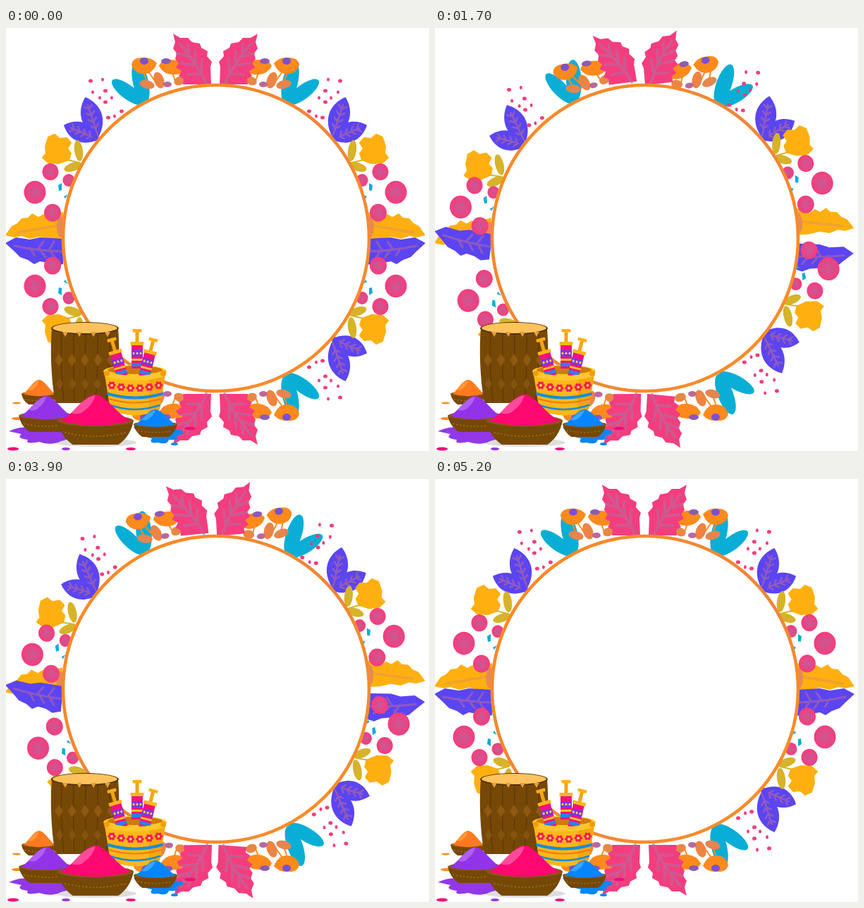
These frames come from a looping animation (600 by 600 pixels, 5.3 s). An HTML page:

```html
<!DOCTYPE html>
<html lang="en">
<head>
<meta charset="utf-8">
<title>Festive wreath</title>
<style>
  html, body { margin: 0; width: 100%; height: 100%; overflow: hidden; background: #fff; }
  svg { display: block; width: 600px; height: 600px; }
</style>
</head>
<body>
<svg id="stage" viewBox="0 0 600 600">
  <defs>
    <radialGradient id="ball"><stop offset=".2" stop-color="#cf5590"/><stop offset=".95" stop-color="#f43d7e"/></radialGradient>
    <linearGradient id="band" x1="0" y1="0" x2="1" y2="1">
      <stop offset="0" stop-color="#ff8c1f"/><stop offset=".5" stop-color="#ef8538"/><stop offset="1" stop-color="#ff8f22"/>
    </linearGradient>
  </defs>
  <g id="plants"></g>
  <circle cx="298" cy="298" r="217" fill="#fff" stroke="url(#band)" stroke-width="4.6"/>
  <g id="props"></g>
</svg>
<script>
const PERIOD = 5300, STEP = 100, CX = 297, CY = 299.5;
const PINK = '#f43d7e', PURPLE = '#5b45f2', YELLOW = '#ffb010', TEAL = '#08aed5',
      ORANGE = '#ff8a1c', OLIVE = '#d6b32a', DUST = '#b8699c', BROWN = '#764806';

const path = (d, fill, extra = '') => `<path d="${d}" fill="${fill}" ${extra}/>`;
const line = (d, color, width = 2, extra = '') =>
  path(d, 'none', `stroke="${color}" stroke-width="${width}" stroke-linecap="round" ${extra}`);
const oval = (x, y, rx, ry, fill, turn = 0) =>
  `<ellipse cx="${x}" cy="${y}" rx="${rx}" ry="${ry}" fill="${fill}" transform="rotate(${turn} ${x} ${y})"/>`;
const rect = (x, y, w, h, fill, r = 0) =>
  `<rect x="${x}" y="${y}" width="${w}" height="${h}" rx="${r}" fill="${fill}"/>`;
const range = (n, draw) => Array.from({ length: n }, (_, i) => draw(i)).join('');

// A leaf growing from (x, y) with side veins
function leaf(x, y, length, width, turn, fill, vein) {
  const veins = range(4, i => {
    const v = -length * (.22 + i * .16), s = width * .2;
    return `M${-s} ${v - 5}L0 ${v}L${s} ${v - 5}`;
  });
  return `<g transform="translate(${x} ${y}) rotate(${turn})">` +
    path(`M0 0C${-width * .75} ${-length * .35} ${-width * .6} ${-length * .75} 0 ${-length}
      C${width * .6} ${-length * .75} ${width * .75} ${-length * .35} 0 0`, fill) +
    line(`M0 0V${-length * .8}${veins}`, vein, 2.5, 'opacity=".6"') + '</g>';
}

// All plants are drawn in the top right quarter, then mirrored
const art = {
  teal: oval(403, 77, 11, 30, TEAL, 13) + oval(421, 91, 10, 28, TEAL, 53),
  purple: leaf(463, 155, 60, 29, 18, PURPLE, DUST) + leaf(462, 158, 54, 27, 68, PURPLE, DUST) +
    line('M459 166L470 152', PURPLE, 6),
  dots: [[457, 73], [474, 75], [471, 91], [453, 89], [444, 99], [453, 105], [461, 99], [430, 118], [440, 125], [449, 127]]
    .map(([x, y], i) => oval(x, y, 2 + i % 2, 2.6, PINK)).join(''),
  pods: line('M352 80L358 64M378 82L392 62M392 82L398 66', ORANGE, 2) +
    oval(348, 75, 8, 6, '#e88745', 20) + oval(377, 74, 7, 12, '#ed8443', 20) +
    oval(394, 80, 11, 6, '#e58550', -15) + oval(365, 80, 6, 4, DUST),
  blooms: path('M339 57Q341 46 358 45Q374 45 377 54Q371 65 359 66Q346 68 339 57M380 50Q388 41 399 42Q414 41 416 52Q412 65 398 65Q386 65 380 50', ORANGE) +
    oval(367, 47, 7, 4, '#8b5ab8') + oval(398, 47, 6, 5, '#7951d0'),
  pinkLeaf: path('M303 80L304 55L302 48L309 40L308 33L317 28L319 22L330 20L336 14L347 14L357 8L354 20L357 29L352 36L354 44L349 50L353 56L345 61L349 68L342 72L343 80Z', PINK) +
    line('M310 80Q320 55 348 22M317 63L316 44M325 52L326 32M335 39L336 23M317 65L337 66M325 53L346 50M334 41L351 36', DUST, 4, 'opacity=".65"'),
  flower: path('M502 163L508 156L518 157L525 151L534 155L538 168L537 178L542 184L534 191L519 192L505 187L502 178L507 171Z', YELLOW, `stroke="${YELLOW}" stroke-width="2" stroke-linejoin="round"`) +
    oval(491, 174, 6, 15, OLIVE, 8) + oval(499, 197, 13, 6, OLIVE, 18) + line('M490 191L507 187', OLIVE),
  balls: [[553, 233, 15.5], [531, 204, 11.5], [505, 216, 8.5], [528, 262, 12]]
    .map(([x, y, r]) => oval(x, y, r, r * 1.05, 'url(#ball)')).join('') +
    path('M515 220L520 223L519 231L515 230ZM506 236L512 239L510 242Z', TEAL),
  yellowLeaf: path('M513 261L524 264L533 269L541 264L548 268L557 263L563 269L572 270L578 277L586 281L595 294L582 297L572 295L560 299L546 296L530 299H513Z', YELLOW) +
    line('M514 279Q535 283 578 290', '#e89a42', 4, 'opacity=".6"') + oval(516, 282, 6, 15, '#e48a58'),
  violetLeaf: path('M513 264L525 261L535 266L546 268L554 264L563 270L574 274L582 282L595 294L580 302L560 299L546 302L513 300Z', PURPLE) +
    line('M514 282Q550 283 582 290M532 284L524 272M546 285L538 274M560 287L553 276M533 284L526 296M549 285L541 296', DUST, 3, 'opacity=".55"')
};

const quarters = [[1, 1], [-1, 1], [-1, -1], [1, -1]];
// Sway in degrees per quarter, clockwise from the top right; [degrees, pivot x, pivot y] moves the pivot
const sways = {
  teal: [[9, 380, 140], [14, 389, 110], null, [-11, 390, 143]],
  yellowLeaf: [[-4.5, 417, 299.5], -3, null, null],
  violetLeaf: [null, null, [10, 460, 299.5], [8, 447, 299.5]],
  purple: [[-11, 467, 149], [-11, 404, 180], null, [-11, 404, 180]],
  dots: [-5.5, -5.5, null, -4],
  pods: [[-14, 372, 105], [-14, 360, 105], -1, 0],
  blooms: [[-14, 384, 129], [-14, 354, 118], -1, 0],
  pinkLeaf: [[-10, 313, 120], [-10, 339, 116], -.5, [7.5, 301, 101]],
  flower: [-4.2, -8, -6.5, -6.5],
  balls: [-4.1, -6.5, -6.5, -7.5]
};

const moving = [];
for (const [name, list] of Object.entries(sways)) {
  list.forEach((sway, q) => {
    if (sway === null) return;
    const [sx, sy] = quarters[q], [turn, px = CX, py = CY] = [sway].flat();
    const node = document.createElementNS('http://www.w3.org/2000/svg', 'g');
    node.innerHTML = art[name];
    plants.append(node);
    moving.push({
      node, turn: turn * sx * sy, pivot: `${px} ${py}`,
      mirror: `translate(${CX} ${CY}) scale(${sx} ${sy}) translate(${-CX} ${-CY})`
    });
  });
}

function bowl(x, y, w, h, peak, color, light) {
  const l = x - w / 2, r = x + w / 2, rise = y - peak;
  return path(`M${l} ${y}Q${x} ${y + h * .25} ${r} ${y}Q${r - w * .04} ${y + h * .65} ${r - w * .2} ${y + h}H${l + w * .2}Q${l + w * .04} ${y + h * .65} ${l} ${y}`, BROWN) +
    oval(x, y, w / 2, h * .24, '#8a5714') +
    path(`M${l + 3} ${y}C${l + w * .2} ${y - 6} ${x - w * .15} ${peak} ${x} ${peak}C${x + w * .14} ${peak} ${r - w * .2} ${y - 6} ${r - 3} ${y}Q${x} ${y + h * .42} ${l + 3} ${y}`, color) +
    path(`M${x - w * .32} ${y - rise * .3}Q${x - w * .13} ${peak + 2} ${x} ${peak + 1}Q${x - w * .04} ${y - rise * .6} ${x - w * .14} ${y - rise * .4}Q${x - w * .2} ${y - rise * .2} ${x - w * .32} ${y - rise * .3}`, light, 'opacity=".8"') +
    line(`M${l + w * .1} ${y + h * .5}Q${x} ${y + h * .8} ${r - w * .1} ${y + h * .5}`, '#a66e1c', 1.5, 'stroke-dasharray="1 4"');
}

const syringe = (x, y, turn) => `<g transform="translate(${x} ${y}) rotate(${turn})">` +
  rect(-2.5, 0, 5, 20, '#f5a40e') + rect(-6.5, -2, 13, 4.5, '#ffae13', 1) +
  rect(-8, 20, 16, 34, '#f6117e') + rect(-8, 28, 16, 9, '#7d35df') + rect(-8, 40, 16, 3, '#ffbf2c') +
  range(3, i => oval(-5 + i * 5, 32.5, 1.5, 1.8, '#ffd04a')) + rect(-8, 46, 16, 5, '#2f7fe8') +
  rect(-9.5, 16, 19, 5, '#ffb51d', 1) + '</g>';

const drum = path('M65 426C62 462 65 506 70 532H153C160 505 162 462 159 426Z', BROWN) +
  range(5, i => line(`M${79 + i * 17} 434Q${77 + i * 18} 485 ${82 + i * 15} 530`, '#613a02', 1.5)) +
  range(5, i => path(`M${75 + i * 18.5} 462l6 9l-6 9l-6 -9Z`, '#8c5913')) +
  range(5, i => path(`M${76 + i * 18} 497l5 8l-5 8l-5 -8Z`, '#855310')) +
  oval(112, 426, 48, 9, '#553100') + oval(112, 425.5, 46, 7.5, '#ffc35d') +
  range(4, i => path(`M${80 + i * 20} 431h8l-4 7Z`, '#e3a23b'));

const bucket = path('M139 486H227L218 541Q183 558 148 541Z', '#ffb719') +
  path('M204 492L226 488L218 541L202 548Z', '#f5a611') +
  oval(183, 487, 45, 9, '#ffc928') + oval(183, 485, 39, 6, '#cf7a09') +
  syringe(150, 442, -16) + syringe(186, 429, 0) + syringe(209, 442, 14) +
  path('M139 487Q183 499 227 487L226 494Q183 506 140 494Z', '#ffc72b') +
  range(6, i => {
    const x = 150 + i * 13.3, y = 506 + 5 * Math.sin((i + .3) / 5.6 * Math.PI);
    return range(6, p => oval(x + 3.7 * Math.cos(p * 1.047), y + 3.7 * Math.sin(p * 1.047), 2.1, 2.1, '#f51c55')) +
      oval(x, y, 1.7, 1.7, '#ffe05f');
  }) +
  line('M145 519Q183 530 221 519', '#168ddd', 4) + line('M146 526Q183 537 220 526', '#f57910', 2) +
  line('M148 535Q183 547 218 535', '#168ddd', 2.5) +
  oval(143, 490, 4, 4, '#f49b0d') + oval(223, 490, 4, 4, '#f49b0d');

props.innerHTML =
  oval(127, 588, 58, 6, '#ddd') +
  path('M4 572Q20 564 50 566L105 570Q96 582 78 586Q64 593 47 587Q26 591 31 584Q14 582 22 576Z', '#9238e8') +
  path('M181 566Q207 569 246 570Q259 574 241 579Q249 585 231 584Q229 592 215 588Q202 590 207 582Q190 580 181 566', '#0b86f3') +
  oval(16, 554, 8, 2, '#ff8924') + oval(15, 532, 6, 1.5, '#ff8924') +
  oval(10, 597, 8, 2.5, '#f50d76') + oval(85, 597, 6, 2, '#9238e8') +
  oval(261, 568, 8, 2.5, '#f50d76') + oval(239, 590, 5, 2, '#0b86f3') +
  oval(177, 597, 7, 2, '#f50d76') + oval(244, 551, 7, 2, '#ff8924') +
  bowl(47, 519, 50, 15, 499, '#ff7a1c', '#ffa044') +
  drum + bucket +
  bowl(57, 550, 78, 23, 522, '#9333e9', '#b66af5') +
  bowl(212, 562, 62, 18, 541, '#0785ff', '#44b2ff') +
  bowl(127, 557, 108, 34, 520, '#ff0872', '#ff5ba5');

function frame(now) {
  const time = Math.floor(now % PERIOD / STEP) * STEP;
  const swing = (1 - Math.cos(time / PERIOD * 2 * Math.PI)) / 2;
  if (frame.last !== time) {
    for (const { node, turn, pivot, mirror } of moving) {
      node.setAttribute('transform', `${mirror} rotate(${turn * swing} ${pivot})`);
    }
    frame.last = time;
  }
  requestAnimationFrame(frame);
}
frame(0);
</script>
</body>
</html>
```
